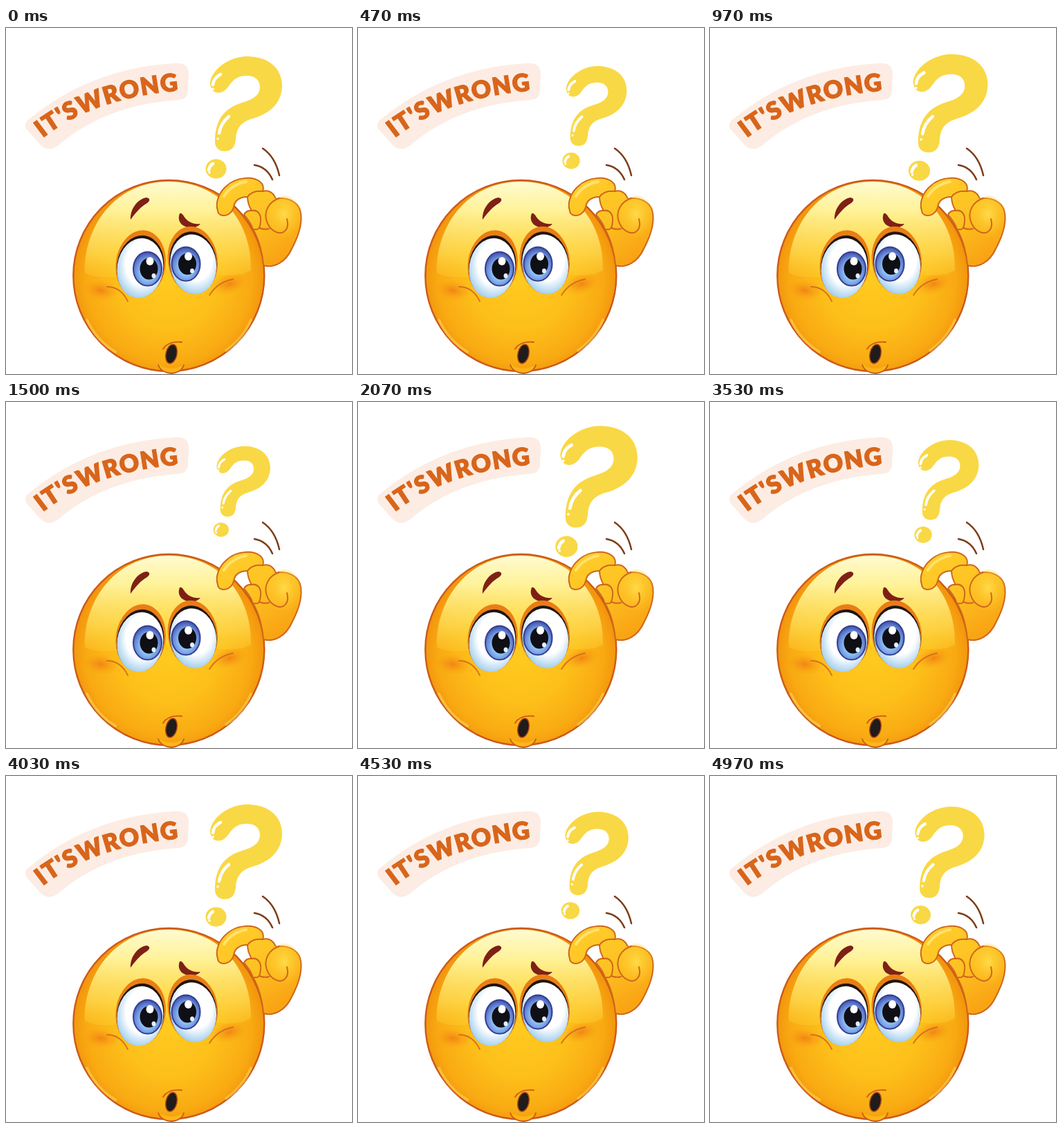
An HTML page that plays this animation: 500x500 px, repeating every 5010 ms.

```html
<!DOCTYPE html>
<html lang="en">
<head>
<meta charset="utf-8">
<title>Puzzled face</title>
<style>
  html, body { margin: 0; width: 100%; height: 100%; overflow: hidden; background: #fff; }
  svg { display: block; width: 100vw; height: 100vh; }
  .line { fill: none; stroke-linecap: round; stroke-linejoin: round; }
  .banner text {
    font: 900 35px Lato, "Open Sans", sans-serif;
    letter-spacing: 1.3px; word-spacing: -9px;
    fill: #d8651a; stroke: #d8651a; stroke-width: 1.2px;
  }
</style>
</head>
<body>
<svg viewBox="0 0 500 500">
  <defs>
    <path id="baseline" d="M53 159Q133 96 270 89"/>
    <radialGradient id="skin" gradientUnits="userSpaceOnUse" cx="235" cy="365" r="140">
      <stop offset="0" stop-color="#ffca20"/>
      <stop offset=".5" stop-color="#fdbf1a"/>
      <stop offset=".85" stop-color="#f9aa12"/>
      <stop offset="1" stop-color="#f2940d"/>
    </radialGradient>
    <linearGradient id="gloss" x1="0" y1="0" x2="0" y2="1">
      <stop offset="0" stop-color="#fffbd0"/>
      <stop offset=".3" stop-color="#fff6a0" stop-opacity=".95"/>
      <stop offset=".75" stop-color="#ffe35a" stop-opacity=".65"/>
      <stop offset="1" stop-color="#ffd93a" stop-opacity=".25"/>
    </linearGradient>
    <radialGradient id="blush">
      <stop offset="0" stop-color="#f07c14" stop-opacity=".85"/>
      <stop offset="1" stop-color="#f79c15" stop-opacity="0"/>
    </radialGradient>
    <radialGradient id="white" cx=".55" cy=".4" r=".62">
      <stop offset=".6" stop-color="#fff"/>
      <stop offset="1" stop-color="#9fcdee"/>
    </radialGradient>
    <radialGradient id="iris" cx=".5" cy=".6" r=".6">
      <stop offset=".4" stop-color="#8fc0f6"/>
      <stop offset=".7" stop-color="#6c90dc"/>
      <stop offset="1" stop-color="#3f4da5"/>
    </radialGradient>
    <linearGradient id="hand" x1="0" y1="0" x2=".55" y2="1">
      <stop offset="0" stop-color="#ffcf2c"/>
      <stop offset=".55" stop-color="#fdc222"/>
      <stop offset="1" stop-color="#f9a414"/>
    </linearGradient>
    <radialGradient id="palm" cx=".5" cy=".45" r=".6">
      <stop offset="0" stop-color="#ffdb48"/>
      <stop offset="1" stop-color="#fdc222" stop-opacity="0"/>
    </radialGradient>
  </defs>

  <g class="banner">
    <path fill="#fcece3" d="M33 132Q124 57 246 51Q263 50 264 65L263 91Q262 103 249 104Q143 111 75 170Q61 180 50 169L32 149Q23 140 33 132Z"/>
    <text><textPath href="#baseline">IT'S WRONG</textPath></text>
  </g>

  <g id="mark">
    <path fill="#f9d845" d="M296 85C290 70 314 41 350 41C382 42 399 60 399 84C398 112 377 125 356 131C339 136 333 145 332 161C331 173 325 178 316 178C306 178 301 171 302 161C303 130 318 115 341 108C358 103 366 97 367 86C367 75 360 69 348 69C334 69 328 75 321 85C313 97 299 96 296 85Z"/>
    <ellipse cx="303.5" cy="203.500" rx="15" ry="14" fill="#f9d845"/>
    <g class="line" stroke="#fff" stroke-width="4.5">
      <path d="M299 82Q300 72 310 67M308 152Q310 138 322 128M293 205Q294 199 299 196"/>
      <path d="M299 88v.1M306 160v.1M294 209v.1" stroke-width="3.500"/>
    </g>
  </g>

  <g class="line" stroke="#7d3c18" stroke-width="2.500">
    <path d="M371 174Q389 186 395 213M359 198Q377 201 385 219"/>
  </g>

  <g class="face">
    <circle cx="235.3" cy="358" r="138" fill="url(#skin)" stroke="#cb5a1a" stroke-width="2.400"/>
    <path fill="url(#gloss)" d="M114 354C112 290 155 222 235 222C315 222 356 287 354 350Q335 362 300 356Q234 342 170 358Q132 364 114 354Z"/>
    <path class="line" stroke="#ffe067" stroke-width="4" opacity=".5" d="M117 422Q131 452 158 468M354 422Q342 450 318 466"/>
    <ellipse cx="137" cy="379" rx="27" ry="15" fill="url(#blush)" transform="rotate(8 137 379)"/>
    <ellipse cx="323" cy="370" rx="27" ry="15" fill="url(#blush)" transform="rotate(-15 323 370)"/>
    <path class="line" stroke="#d9701a" stroke-width="1.800" d="M146 374Q166 374 176 395M294 386Q306 367 328 363"/>
  </g>

  <g class="brows" fill="#7e2016">
    <path d="M180 277C179 262 190 247 203 245C208 246 209 249 204 253C194 259 188 266 180 277Z"/>
    <path d="M251 268C249 273 249 279 254 284C263 291 275 290 281 283C270 284 262 280 257 272Q254 267 251 268Z"/>
  </g>

  <g id="eyes"></g>

  <g class="mouth">
    <path d="M221 487C224 503 252 504 257 487Q239 497 221 487Z" fill="#fdb518"/>
    <path class="line" stroke="#cb5a1a" stroke-width="1.800" d="M220 487C226 503 252 503 257 487M227 464Q234 452 254 454"/>
    <ellipse cx="239" cy="471" rx="8" ry="14" transform="rotate(12 239 471)" fill="#211b1b" stroke="#a94a12" stroke-width="1.500"/>
  </g>

  <g class="hand" stroke="#cf671a" stroke-width="2" stroke-linejoin="round">
    <path fill="url(#hand)" d="M306 264C302 252 308 237 319 228C333 215 356 214 367 222Q374 228 371 236C380 233 387 239 390 247C404 244 420 249 425 263C430 281 422 302 413 319C405 337 388 348 372 343C371 328 366 306 357 291Q353 280 344 270Q347 263 355 264Q349 254 349 244C337 244 330 250 329 259C326 269 317 273 310 270Q306 268 306 264Z"/>
    <ellipse cx="402" cy="272" rx="24" ry="30" fill="url(#palm)" stroke="none"/>
    <path class="line" d="M349 244Q356 234 371 236M355 264C363 262 369 269 368 279C367 289 366 292 359 291M366 289Q374 292 380 290"/>
    <path class="line" d="M395 246C379 251 372 266 377 280C382 294 397 301 404 292Q409 287 406 276"/>
    <path class="line" stroke="#ffec8c" stroke-width="4" opacity=".7" d="M315 243Q326 226 347 222"/>
  </g>
</svg>

<script>
const LOOP = 5010, STEP = 33.4;
const PERIOD = 27.8, PEAK = 4.4; // in steps
const PIVOT = [332, 130];

const ellipse = (x, y, rx, ry, fill, extra = "") =>
  `<ellipse cx="${x}" cy="${y}" rx="${rx}" ry="${ry}" fill="${fill}" ${extra}/>`;

function eye(x, y, tilt, irisX, irisY) {
  const spin = `transform="rotate(${tilt} ${x} ${y})"`;
  return ellipse(x, y - 5, 36, 49, "#e97e15", spin)
    + ellipse(x, y - 1.5, 34, 45, "#20140e", spin)
    + ellipse(x, y + 1, 33.3, 43.5, "url(#white)", spin)
    + ellipse(irisX, irisY, 20.5, 24.5, "url(#iris)", 'stroke="#343f94" stroke-width="2"')
    + ellipse(irisX + 2, irisY, 13, 15.5, "#0f0f16")
    + ellipse(irisX + 3.5, irisY - 11, 5.5, 6, "#fff")
    + ellipse(irisX + 9, irisY + 10, 3, 3.5, "#e4f0fc");
}
document.getElementById("eyes").innerHTML =
  eye(194, 346, 8, 204.5, 348) + eye(270.5, 340.5, -8, 260, 341);

const mark = document.getElementById("mark");
const [px, py] = PIVOT;

// Linear swell and shrink: distance in steps to the nearest peak sets the size.
function scaleAt(time) {
  const step = Math.floor((time % LOOP) / STEP + 0.3);
  const phase = (step - PEAK + PERIOD) % PERIOD;
  const distance = Math.min(phase, PERIOD - phase);
  return (100.5 - 2.7 * distance) / 88.6;
}

const start = performance.now();
function draw(now) {
  const scale = scaleAt(Math.max(0, now - start));
  mark.setAttribute("transform", `translate(${px} ${py}) scale(${scale}) translate(${-px} ${-py})`);
  requestAnimationFrame(draw);
}
draw(start);
</script>
</body>
</html>
```
